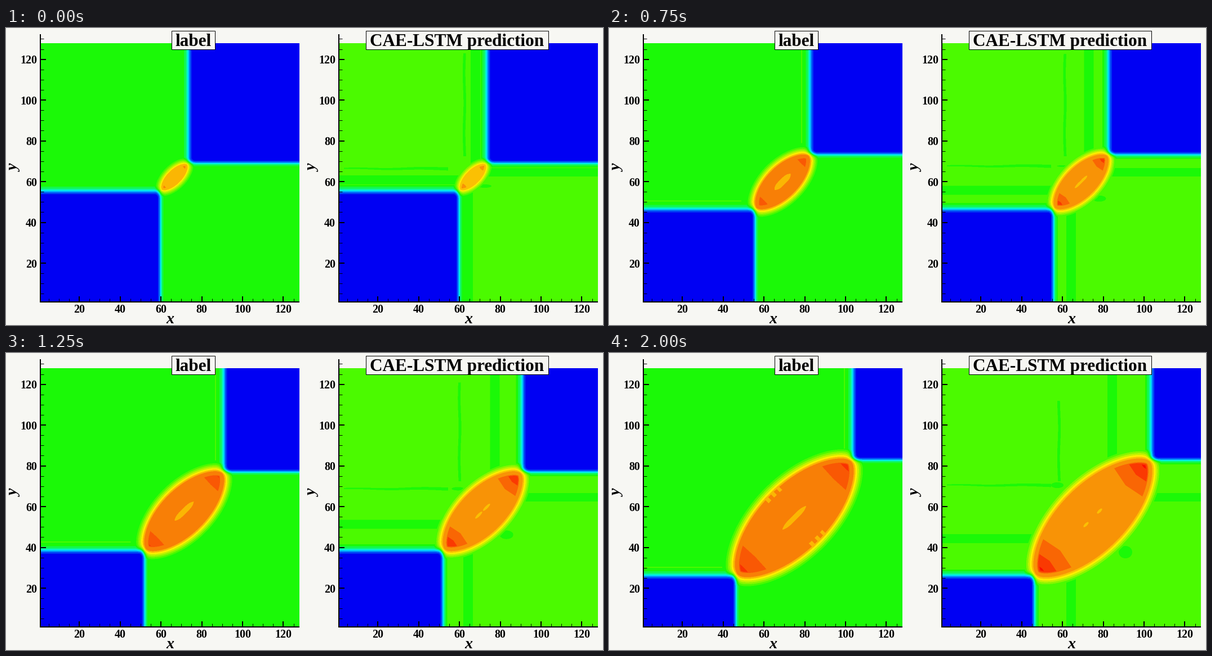
A matplotlib script that plays this animation: 1060x528 px, repeating every 2250 ms.

```python
import numpy as np
import matplotlib.pyplot as plt
from matplotlib.animation import FuncAnimation
from matplotlib.patches import Rectangle

W, H, DPI = 1060, 528, 100
N, STEP = 9, 250
LEFT, RIGHT, TOP, BOTTOM = 61, 521, 27, 487
SHIFT = 530                      # distance between the two panels
UNIT = 3.624                     # pixels per axis unit
SS = 2                           # supersampling of the field
PAPER = "#f7f7f3"


def rainbow(orange):
    """18 contour colours from blue to red."""
    stops = [0, 4.5, 8, 9, 12, 14, 17]
    keys = np.array([(0, 0, 243), (0, 245, 255), (27, 249, 7), (75, 250, 0),
                     (255, 238, 0), (248, orange, 6), (252, 12, 0)])
    return np.stack([np.interp(np.arange(18), stops, c) for c in keys.T], axis=1)


LABEL, PRED = rainbow(127), rainbow(147)

xs = LEFT + (np.arange((RIGHT - LEFT) * SS) + 0.5) / SS
ys = TOP + (np.arange((BOTTOM - TOP) * SS) + 0.5) / SS
X, Y = np.meshgrid(xs, ys)


def progress(t):
    """Share of the total shock travel at step t."""
    return np.interp(t, [0, 2, 4, 6, 7, 8], [0, 0.17, 0.44, 0.715, 0.835, 1])


def quadrant(a, b, r=9):
    """Signed depth inside a quadrant with a rounded corner."""
    return r - np.hypot(np.maximum(r - a, 0), np.maximum(r - b, 0))


def oval(x, y, cx, cy, rx, ry):
    return ((x - cx) / rx) ** 2 + ((y - cy) / ry) ** 2 < 1


def pred_dips(s, w, depth):
    """Where the predicted plateau lies one level lower."""
    upper, lower = w < 0, w > 0
    dip = depth > -8
    dip |= upper & (np.abs(X - 303.5 - 60 * s) < 8.5)
    dip |= upper & (np.abs(Y - 270 - 60 * s) < 8)
    dip |= lower & (np.abs(X - 290.5) < 8.5)
    dip |= lower & (np.abs(Y - 256.5) < 7.5)
    # thin residual lines and the spots they leave
    lx, ly = 284 - 15 * s, 250 - 15 * s
    dip |= (np.abs(X - lx - np.sin(Y / 17) * 0.7) < 2.4) & (Y > 45 + 40 * s ** 3) & (Y < 228)
    grow = 1 + 1.8 * (X - LEFT) / 190
    dip |= (np.abs(Y - ly - np.sin(X / 19) * 0.7) < grow) & (X > 70) & (X < 255)
    dip |= oval(X, Y, lx - 3, ly, 11, 5 * s + 0.1)
    dip |= oval(X, Y, 320 + 67 * s, 281 + 73 * s, 12, 3 + 8 * s)
    return dip


def field(t, pred):
    s = progress(t)
    x1, y1 = 274 - 49 * s, 290 + 106 * s
    x2, y2 = 324 + 109 * s, 240 - 50 * s
    dx, dy = X - (x1 + x2) / 2, Y - (y1 + y2) / 2
    u, w = (dx - dy) / np.sqrt(2), (dx + dy) / np.sqrt(2)
    au, aw = np.abs(u), np.abs(w)
    h = np.hypot(x2 - x1, y2 - y1) / 2

    # the fast shocks are smeared more than the slow ones
    depth = np.maximum(quadrant((X - x2) / 1.4, y2 - Y),
                       quadrant(x1 - X, (Y - y1) / 1.4))

    # plateau
    if pred:
        base = np.where(pred_dips(s, w, depth), 8.5, 9.5)
    else:
        trail = (np.abs(X - x2 + 15) < 1) & (Y < y2 - 20)
        trail |= (np.abs(Y - y1 + 15) < 1) & (X < x1 - 24)
        base = np.where(trail & (s > 0.3), 9.5, 8.5)

    # lens of high pressure; dist approximates the distance to its rim
    core = 14 if t else 13
    length, width, p = h - 3, (0.4 if t else 0.36) * h, 1.54
    q = 1 - (u / length) ** 2 - (aw / width) ** p
    grad = np.hypot(2 * u / length ** 2, p * aw ** (p - 1) / width ** p)
    dist = q / (grad + 1e-4)
    lens = np.minimum(core + dist / (2 + 0.9 * s), core + 0.5)

    # hotter steps towards both tips: start along u, margin to the rim
    tips = [(0.56, 7), (0.74, 9), (0.87, 12)] if pred else [(0.67, 8), (0.86, 10)]
    bulge = 0.2 if pred else 0.05
    for start, margin in tips:
        lens += (au > start * h + bulge * aw) & (dist > margin * min(1, h / 55))

    # cooler streak in the middle, and ragged rims late in the label
    if pred:
        cool = oval(au, w, 17 * s, 0, 12 - 6 * s, 2.3)
    else:
        half = 16 + 14 * s
        cool = aw < (4.5 + 3 * (1 - s) ** 3) * (1 - (u / half) ** 4)
        cool |= (au < 20) & (dist < 40 * (s - 0.8)) & (np.sin(u * 0.45) > 0)
    lens = np.where(cool & (dist > 0) & (t > 0), core - 0.5, lens)

    drop = (1 + np.tanh(depth / 4)) / 2
    return np.maximum(base, lens) * (1 - drop)


def paint(t, pred):
    colors = PRED if pred else LABEL
    level = np.clip(field(t, pred).astype(int), 0, len(colors) - 1)
    rgb = colors[level]
    rows, cols = rgb.shape[0] // SS, rgb.shape[1] // SS
    return rgb.reshape(rows, SS, cols, SS, 3).mean(axis=(1, 3)).astype(np.uint8)


fig = plt.figure(figsize=(W / DPI, H / DPI), dpi=DPI, facecolor=PAPER)
ax = fig.add_axes([0, 0, 1, 1])
ax.axis("off")


def px(n):
    return n * 72 / DPI


def text(x, y, s, size, **kw):
    kw = {"ha": "center", "va": "baseline", **kw}
    ax.text(x, y, s, fontsize=px(size), family="Liberation Serif",
            weight="bold", color="black", zorder=6, **kw)


def line(x, y, lw):
    ax.plot(x, y, color="black", lw=px(lw), solid_capstyle="butt", zorder=4)


def panel(dx, title, box_x, box_w, pixels):
    x0 = LEFT + dx
    line([x0, x0], [11, BOTTOM + 1], 2)
    line([x0, RIGHT + dx], [BOTTOM, BOTTOM], 2)
    for v in range(5, 135, 5):
        major = v % 20 == 0
        size, lw = (10, 2) if major else (6, 1)
        tx, ty = dx + 57.6 + v * UNIT, 490.5 - v * UNIT
        line([x0, x0 + size], [ty, ty], lw)
        if v < 128:
            line([tx, tx], [BOTTOM, BOTTOM - size], lw)
        if major:
            text(x0 - 6, ty, str(v), 20, ha="right", va="center_baseline")
            text(tx, 506, str(v), 20)
    text(291 + dx, 525, "x", 28, style="italic")
    text(15 + dx, 249, "y", 28, style="italic", rotation=90, va="center")
    ax.add_patch(Rectangle((box_x, 4.5), box_w, 33, fc=PAPER, ec="black",
                           lw=px(1), zorder=5))
    text(box_x + box_w / 2, 32, title, 31.3)
    return ax.imshow(pixels, extent=(x0, RIGHT + dx, BOTTOM, TOP),
                     interpolation="nearest", aspect="auto", zorder=1)


frames = [(paint(t, False), paint(t, True)) for t in range(N)]
images = [panel(0, "label", 293.5, 77, frames[0][0]),
          panel(SHIFT, "CAE-LSTM prediction", 638.5, 324, frames[0][1])]
ax.set_xlim(0, W)
ax.set_ylim(H, 0)


def update(i):
    for im, data in zip(images, frames[i]):
        im.set_data(data)
    return images


anim = FuncAnimation(fig, update, frames=N, interval=STEP, repeat=True,
                     repeat_delay=0, blit=False)
plt.show()
```
